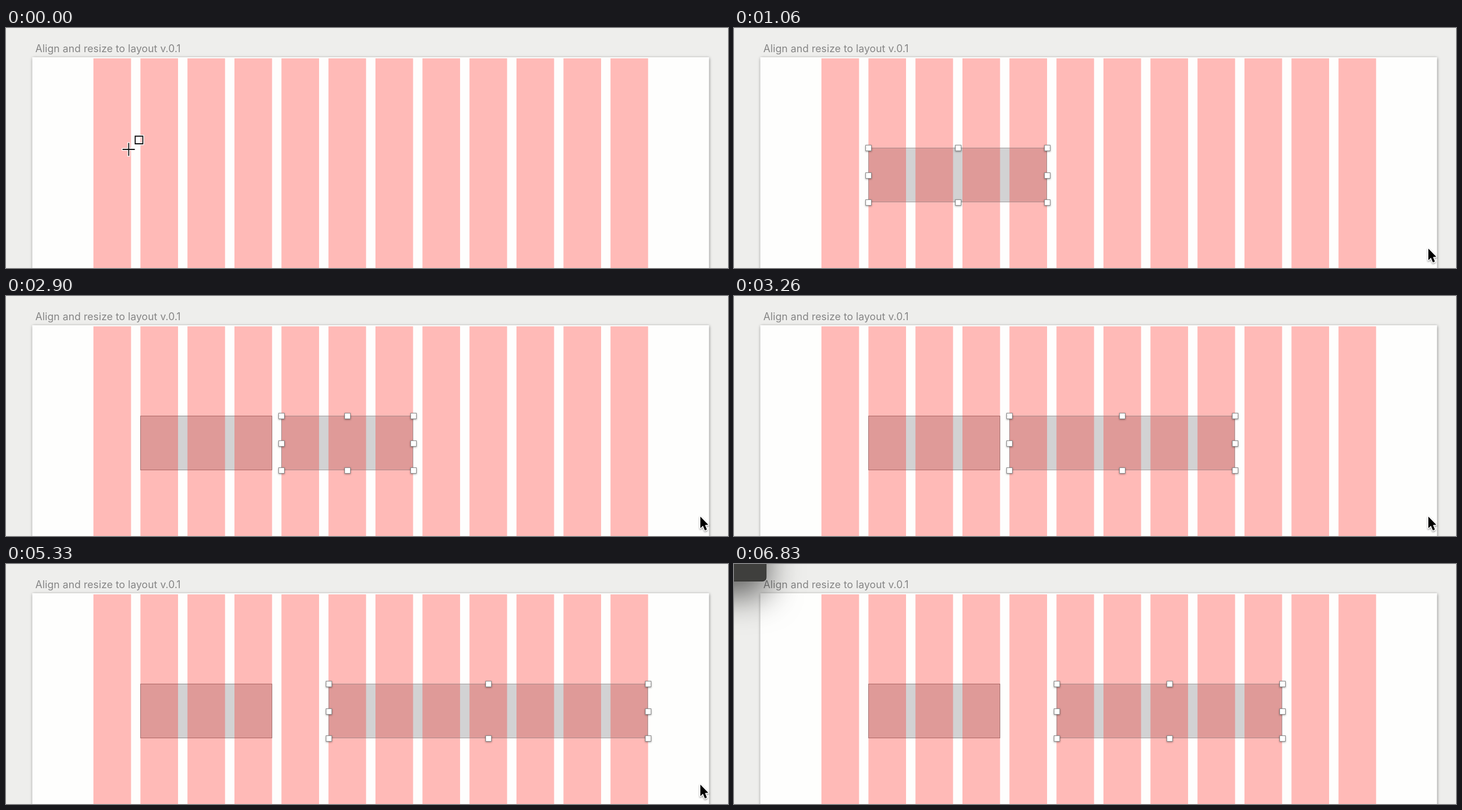
Animation, 1280 px wide and 427 px high, one loop 7.03 s. Source, as an HTML page with a canvas:

```html
<!DOCTYPE html>
<html lang="en">
<head>
<meta charset="utf-8">
<title>Align and resize to layout</title>
<style>
  html, body { margin: 0; width: 100%; height: 100%; overflow: hidden; background: #eeeeec; }
  canvas { display: block; }
</style>
</head>
<body>
<canvas id="stage" width="1280" height="427"></canvas>
<script>
const ctx = document.getElementById('stage').getContext('2d');
const LOOP = 7030, TOP = 213, BOTTOM = 310;

// Layout: 12 columns; a is a column's left edge, b its right edge
const STEP = 250 / 3, COL = STEP * 0.8;
const a = n => 155 + STEP * (n - 1);
const b = n => a(n) + COL;

// Each entry: time, left edge, right edge
const first = [
  [400, b(1), b(5) - STEP + COL], [1060, a(2), b(5)],
  [1300, a(2), a(5)], [1470, a(2), b(4)]
];
const W3 = 2 * STEP + COL, W7 = 6 * STEP + COL;
const move = (t, x, w) => [t, x, x + w];
const second = [
  move(2400, b(2), W3), move(2530, a(3), W3), move(2570, b(3), W3),
  move(2610, a(4), W3), move(2660, b(4), W3), move(2900, a(5), W3),
  ...[3100, 3160, 3210, 3260, 3300, 3370, 3450, 3530].map((t, i) =>
    [t, a(5), i % 2 ? b(8 + (i - 1) / 2) : a(8 + i / 2)]),
  move(4130, b(5), W7), move(4300, a(6), W7),
  move(4900, b(5), W7), move(5000, a(5), W7),
  move(5230, b(5), W7), move(5330, a(6), W7),
  [5560, a(6), a(12)], [5630, a(6), b(11)],
  [5690, a(6), a(11)], [5760, a(6), b(10)]
];
first[0][2] = first[0][1] + 3 * STEP + COL;

const clamp = v => Math.max(0, Math.min(1, v));
const ease = (t, from, to) => { const p = clamp((t - from) / (to - from)); return p * p * (3 - 2 * p); };
const mix = (p, q, k) => p + (q - p) * k;
const stateAt = (list, t) => list.filter(s => s[0] <= t).pop();

function shadow(color, blur, y) {
  ctx.shadowColor = color;
  ctx.shadowBlur = blur;
  ctx.shadowOffsetY = y;
}

function artboard() {
  ctx.fillStyle = '#eeeeec';
  ctx.fillRect(0, 0, 1280, 427);
  ctx.save();
  shadow('rgba(0,0,0,.55)', 5, 0.5);
  ctx.fillStyle = '#fefefd';
  ctx.fillRect(46.5, 52, 1200, 420);
  ctx.restore();
  ctx.fillStyle = '#858585';
  ctx.font = '18px Inter, "Open Sans", sans-serif';
  ctx.letterSpacing = '0.1px';
  ctx.fillText('Align and resize to layout v.0.1', 52, 42.5);
}

function box(l, r, bottom, selected) {
  ctx.fillStyle = '#d2d2d3';
  ctx.fillRect(l, TOP, r - l, bottom - TOP);
  ctx.strokeStyle = selected ? '#a9a9a9' : '#8c8c8c';
  ctx.lineWidth = 1;
  ctx.strokeRect(Math.round(l) + 0.5, TOP + 0.5, Math.round(r) - Math.round(l) - 1, bottom - TOP - 1);
}

function columns() {
  ctx.fillStyle = 'rgba(255,8,0,.277)';
  for (let i = 1; i <= 12; i++) ctx.fillRect(a(i), 54, COL, 373);
}

function handles(l, r, bottom) {
  ctx.strokeStyle = 'rgba(150,150,150,.55)';
  ctx.lineWidth = 1;
  ctx.strokeRect(Math.round(l) + 0.5, TOP + 0.5, Math.round(r) - Math.round(l) - 1, bottom - TOP - 1);
  const xs = [l, (l + r) / 2, r], ys = [TOP, (TOP + bottom) / 2, bottom];
  xs.forEach((x, i) => ys.forEach((y, j) => {
    if (i === 1 && j === 1) return;
    const px = Math.round(x) - 5, py = Math.round(y) - 5;
    ctx.save();
    shadow('rgba(0,0,0,.4)', 3, 1);
    ctx.fillStyle = '#8a8a8a';
    ctx.fillRect(px, py, 11, 11);
    ctx.restore();
    ctx.fillStyle = '#fff';
    ctx.fillRect(px + 1, py + 1, 9, 9);
  }));
}

function crosshair(x, y) {
  const path = new Path2D();
  path.moveTo(x - 10, y); path.lineTo(x + 10, y);
  path.moveTo(x, y - 10.5); path.lineTo(x, y + 10.5);
  path.rect(x + 11.5, y - 23.5, 13.5, 13.5);
  ctx.lineCap = 'square';
  for (const [color, width] of [['#fff', 4.5], ['#111', 1.8]]) {
    ctx.strokeStyle = color;
    ctx.lineWidth = width;
    ctx.stroke(path);
  }
  ctx.lineCap = 'butt';
}

function arrow(x, y) {
  ctx.save();
  ctx.translate(x, y);
  ctx.beginPath();
  [[0, 0], [0, 20.5], [4.6, 16.3], [8, 24.5], [11.6, 23], [8.2, 15], [14, 14.6]]
    .forEach(p => ctx.lineTo(...p));
  ctx.closePath();
  ctx.lineJoin = 'round';
  ctx.strokeStyle = '#fff';
  ctx.lineWidth = 3;
  shadow('rgba(0,0,0,.4)', 3, 1.5);
  ctx.stroke();
  shadow('transparent', 0, 0);
  ctx.fillStyle = '#000';
  ctx.fill();
  ctx.restore();
}

function panel(alpha) {
  ctx.save();
  ctx.globalAlpha = alpha;
  shadow('rgba(0,0,0,.62)', 60, 24);
  ctx.fillStyle = '#2c2c2b';
  ctx.beginPath();
  ctx.roundRect(-500, -500, 557.5, 531, 7);
  ctx.fill();
  shadow('transparent', 0, 0);
  ctx.fillStyle = '#3f3f3d';
  ctx.beginPath();
  ctx.roundRect(-500, -500, 556.5, 530, 6);
  ctx.fill();
  ctx.restore();
}

function cursor(t, k) {
  if (t < 400) return crosshair(mix(217.5, 541, k), mix(216, 312, k));
  if (t >= 6200) return;
  const out = ease(t, 400, 570), back = ease(t, 570, 660);
  arrow(mix(mix(541, 1266, out), 1231, back), mix(mix(312, 408, out), 392.5, back));
}

function draw(t) {
  const k = ease(t, 30, 390);
  let one = stateAt(first, t), bottom = BOTTOM;
  if (!one && t >= 30) {
    one = [t, b(1), mix(b(1), first[0][2], k)];
    bottom = Math.round(mix(TOP + 1, BOTTOM, k));
  }
  const two = stateAt(second, t);
  const active = two || one;

  artboard();
  if (one) box(one[1], one[2], bottom, !two);
  if (two) box(two[1], two[2], BOTTOM, true);
  columns();
  if (active && active[2] - active[1] > 8) handles(active[1], active[2], bottom);
  cursor(t, k);
  if (t >= 6800) panel(t < 6830 ? 0.5 : 1);
}

const start = performance.now();
function tick() {
  draw((performance.now() - start) % LOOP);
  requestAnimationFrame(tick);
}
tick();
</script>
</body>
</html>
```
